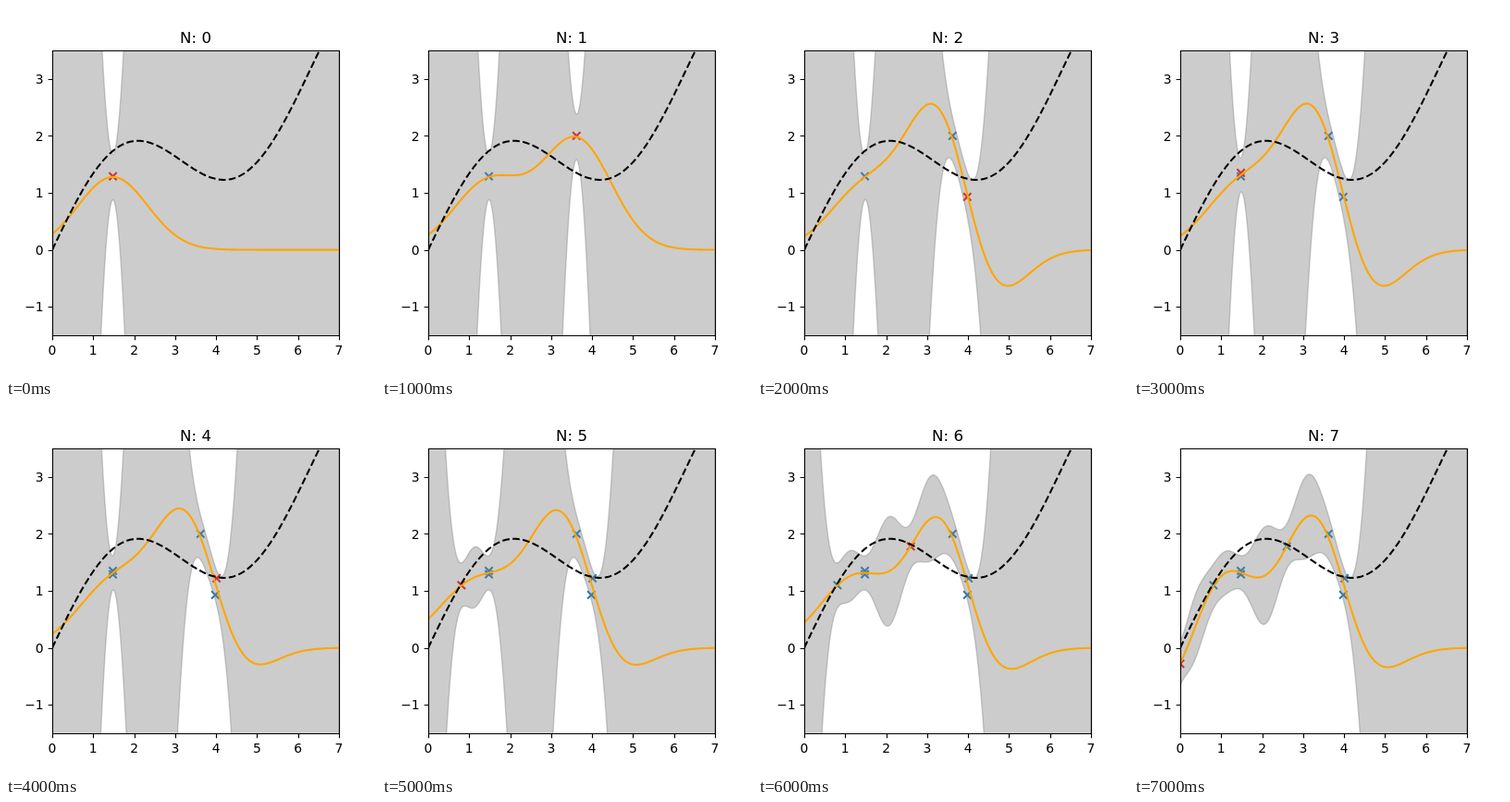
An HTML page that plays this animation: 400x400 px, repeating every 8000 ms.

```html
<!DOCTYPE html>
<html>
<head>
<meta charset="utf-8">
<style>
html, body { margin: 0; width: 100%; height: 100%; overflow: hidden; background: #fff; }
svg { display: block; }
text { font: 13.89px "DejaVu Sans", sans-serif; }
#title { font-size: 16.67px; }
path { fill: none; stroke-width: 2.083; }
#band { fill: #808080; stroke: #808080; fill-opacity: .4; stroke-opacity: .4; stroke-width: 1.39; }
#axes { stroke: #000; stroke-width: 1.11; }
</style>
</head>
<body>
<svg width="400" height="400" viewBox="0 0 400 400">
  <clipPath id="plot"><rect x="50" y="48" width="310" height="308"/></clipPath>
  <g clip-path="url(#plot)">
    <path id="seen" stroke="#1f77b4"/>
    <path id="latest" stroke="red"/>
    <path id="band"/>
    <path id="mean" stroke="orange"/>
    <path id="truth" stroke="#000" stroke-dasharray="7.71 3.33"/>
  </g>
  <path id="axes"/>
  <g id="labels"></g>
  <text id="title" x="205" y="39.8" text-anchor="middle"></text>
</svg>
<script>
// Gaussian process regression, one more observation each second
const points = [[1.48, 1.29], [3.62, 2], [3.98, .93], [1.48, 1.35],
                [4.01, 1.22], [.81, 1.1], [2.6, 1.78], [0, -.28]];
const AMPLITUDE = 21, NOISE = .2, LENGTH = .85, STEP_MS = 1000;

const $ = id => document.getElementById(id);
const X = x => 50 + x * 310 / 7;
const Y = y => 356 - (y + 1.5) * 61.6;
const xs = Array.from({ length: 351 }, (_, i) => i / 50);
const line = pts => 'M' + pts.map(([x, y]) => X(x).toFixed(2) + ' ' + Y(y).toFixed(2)).join('L');
const cross = ([x, y]) => `M${X(x) - 4.17} ${Y(y) - 4.17}l8.34 8.34m0-8.34l-8.34 8.34`;
const kernel = (a, b) => AMPLITUDE * Math.exp(-((a - b) ** 2) / (2 * LENGTH ** 2));
const dot = (a, b) => a.reduce((sum, v, i) => sum + v * b[i], 0);

function invert(matrix) {
  const n = matrix.length;
  const m = matrix.map((row, i) => [...row, ...row.map((_, j) => +(i === j))]);
  for (let c = 0; c < n; c++) {
    const pivot = m[c][c];
    m[c] = m[c].map(v => v / pivot);
    for (let r = 0; r < n; r++) {
      if (r === c) continue;
      const f = m[r][c];
      m[r] = m[r].map((v, j) => v - f * m[c][j]);
    }
  }
  return m.map(row => row.slice(n));
}

function show(n) {
  const data = points.slice(0, n + 1);
  const inverse = invert(data.map(([a], i) =>
    data.map(([b], j) => kernel(a, b) + (i === j ? NOISE : 0))));
  const weights = inverse.map(row => dot(row, data.map(p => p[1])));
  const mean = [], upper = [], lower = [];
  for (const x of xs) {
    const k = data.map(p => kernel(x, p[0]));
    const mu = dot(k, weights);
    const variance = AMPLITUDE + NOISE - dot(k, inverse.map(row => dot(row, k)));
    mean.push([x, mu]);
    upper.push([x, mu + variance]);
    lower.push([x, mu - variance]);
  }
  $('mean').setAttribute('d', line(mean));
  $('band').setAttribute('d', line([...upper, ...lower.reverse()]) + 'Z');
  $('seen').setAttribute('d', data.slice(0, -1).map(cross).join(''));
  $('latest').setAttribute('d', cross(data[n]));
  $('title').textContent = 'N: ' + n;
}

function drawAxes() {
  let d = 'M50.5 48.5H360.5V356.5H50.5Z', labels = '';
  const snap = v => Math.floor(v + .5) + .5;
  for (let x = 0; x <= 7; x++) {
    d += `M${snap(X(x))} 356.5v4.86`;
    labels += `<text x="${X(x)}" y="376.6" text-anchor="middle">${x}</text>`;
  }
  for (let y = -1; y <= 3; y++) {
    d += `M50.5 ${snap(Y(y))}h-4.86`;
    labels += `<text x="40.6" y="${Y(y) + 5.2}" text-anchor="end">${y < 0 ? '\u2212' + -y : y}</text>`;
  }
  $('axes').setAttribute('d', d);
  $('labels').innerHTML = labels;
  $('truth').setAttribute('d', line(xs.map(x => [x, x / 2 + Math.sin(x)])));
}

let shown = -1;
const start = performance.now();
function tick() {
  const n = Math.floor((performance.now() - start) / STEP_MS) % points.length;
  if (n !== shown) show(shown = n);
  requestAnimationFrame(tick);
}
drawAxes();
tick();
</script>
</body>
</html>
```
